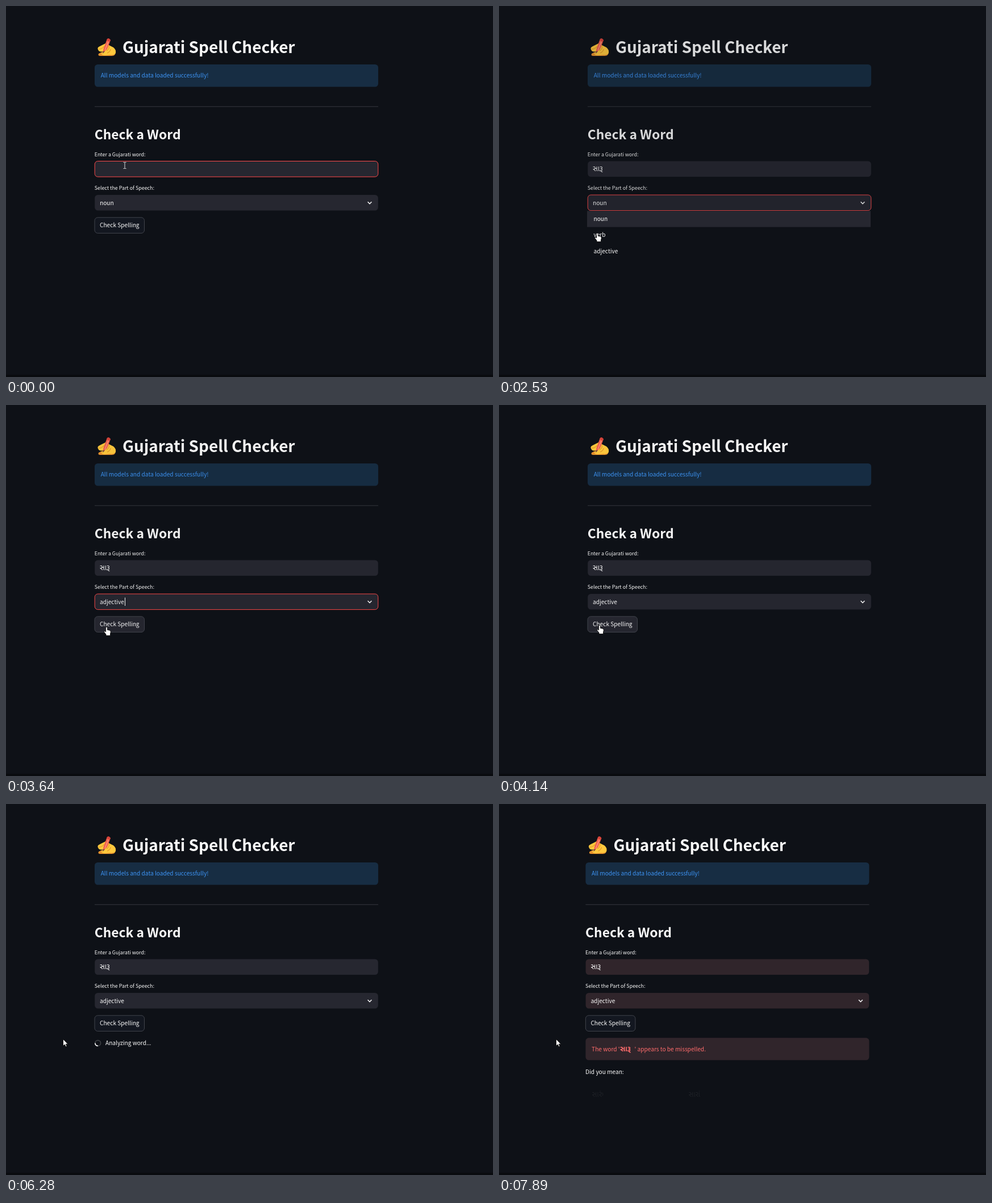
These frames come from a looping animation (857 by 654 pixels, 8 s). An HTML page:

```html
<!DOCTYPE html>
<html lang="en">
<head>
<meta charset="utf-8">
<title>Gujarati Spell Checker</title>
<style>
  html, body { margin: 0; width: 100%; height: 100%; overflow: hidden; background: #0e1117; }
  svg { display: block; width: 857px; height: 654px; }
  text { font: 10.15px "Noto Sans CJK SC", "Noto Sans CJK JP", "Noto Sans CJK", "Open Sans", sans-serif; fill: #fafafa; white-space: pre; }
  .title { font-size: 27.9px; font-weight: 700; }
  .heading { font-size: 22.8px; font-weight: 600; }
  .label { font-size: 8.88px; }
  .hint { font-size: 7.6px; fill: #a3a3a8; text-anchor: end; }
  .info { fill: #3d94f5; }
  .error text { fill: #ff6c6c; }
  .guj { font: 12.3px "Noto Sans Gujarati", "Noto Serif Gujarati", "Noto Sans", sans-serif; }
  .error .guj { font-weight: 700; }
  .field { fill: #262730; }
  .caret { fill: #fafafa; }
  .faint { opacity: .06; }
  .hidden { display: none; }
</style>
</head>
<body>
<svg viewBox="0 0 857 654">
  <rect width="857" height="654" fill="#0e1117"/>
  <rect y="650" width="857" height="4" fill="#090b0f"/>

  <g id="page">
    <g id="main">
      <g id="emoji">
        <path d="M163 84Q170 79 176 82L192 80Q194 88 186 88H166Q161 88 163 84Z" fill="#e8912d"/>
        <path d="M162 77Q160 73 165 71L175 66Q179 65 181 69L189 73Q194 77 193 83Q190 87 184 86L174 87Q168 87 168 83L171 80Q164 82 162 77Z" fill="#ffc83d"/>
        <path d="M178 58L184 60L178 76L170 83L172 74Z" fill="#f2604d"/>
        <path d="M178 58Q181 55 184 60L182.8 63L177 61Z" fill="#d8433a"/>
        <path d="M180 63L174 78" stroke="#ff9a80" stroke-width="1.3"/>
        <path d="M171 80L170 84L174 80Z" fill="#5a4038"/>
        <path d="M163 76Q169 76 173 71M181 70Q183 75 177 79M184 76Q184 80 178 83" fill="none" stroke="#e29a28" stroke-width="1.2"/>
      </g>
      <text class="title" x="205" y="83">Gujarati Spell Checker</text>
      <rect x="156" y="103" width="499" height="39.5" rx="5.5" fill="#172d43"/>
      <text class="info" x="166.7" y="126.3">All models and data loaded successfully!</text>
      <path d="M156 177.3H655" stroke="#35373e"/>
      <text class="heading" x="155.7" y="235">Check a Word</text>

      <text class="label" x="155.7" y="264.6">Enter a Gujarati word:</text>
      <rect id="input" class="field" x="156.2" y="273.5" width="498.6" height="27.6" rx="5.5"/>
      <text id="word" class="guj" x="165" y="290.6"></text>
      <rect id="wordCaret" class="caret" y="279.5" width="1" height="14.5"/>
      <text id="hint" class="hint" x="648.5" y="296">Press Enter to apply</text>

      <text class="label" x="155.7" y="324.4">Select the Part of Speech:</text>
      <rect id="select" class="field" x="156.2" y="333" width="498.6" height="27.6" rx="5.5"/>
      <text id="choice" x="165" y="350.5"></text>
      <rect id="choiceCaret" class="caret" x="209" y="339.5" width="1" height="14.5"/>
      <path d="M636.6 345.3L640 348.7L643.4 345.3" fill="none" stroke="#fafafa" stroke-width="1.6"/>

      <rect id="button" x="156" y="372.8" width="87.5" height="27.7" rx="5.5" stroke="#41444c"/>
      <text x="199.8" y="390.2" text-anchor="middle">Check Spelling</text>
    </g>

    <g id="loading">
      <circle cx="161.7" cy="421.5" r="4.9" fill="none" stroke="#3d4045" stroke-width="1.6"/>
      <path id="arc" d="M3.46-3.46A4.9 4.9 0 0 1 3.46 3.46" fill="none" stroke="#fafafa" stroke-width="1.7"/>
      <text x="175" y="425">Analyzing word...</text>
    </g>

    <g id="error" class="error">
      <rect x="156" y="412.3" width="499" height="39.3" rx="5.5" fill="#30252b"/>
      <text x="166.7" y="435.6">The word '</text>
      <text class="guj" x="216.6" y="436">સારૂ</text>
      <text x="242" y="435.6">' appears to be misspelled.</text>
    </g>

    <g id="suggestions">
      <text x="155.7" y="476">Did you mean:</text>
      <text class="guj faint" x="167" y="516">સારું</text>
      <text class="guj faint" x="337" y="516">સારાં</text>
    </g>
  </g>

  <g id="menu">
    <rect x="155" y="361.3" width="499" height="85" fill="#0e1117"/>
    <rect id="row" x="155" width="499" height="28.3" fill="#262730"/>
    <text x="166.5" y="379">noun</text>
    <text x="166.5" y="407.4">verb</text>
    <text x="166.5" y="435.8">adjective</text>
  </g>

  <g id="cursor" stroke="#000" stroke-width=".8" stroke-linejoin="round" fill="#fff">
    <path id="beam" d="M-2.5-5.5H-.7L0-5L.7-5.5H2.5M0-5V5M-2.5 5.5H-.7L0 5L.7 5.5H2.5" fill="none" stroke="#d8d8d8" stroke-width="1"/>
    <path id="arrow" d="M0 0V12L2.8 9.4L4.8 13.6L6.6 12.8L4.8 8.7H8.4Z"/>
    <path id="hand" d="M-1.4 1Q0-.8 1.4 1V5.4L5.4 6.2Q7.6 6.8 7.3 9.2L6.4 13V15.6H-1V13.4L-4.3 9.2Q-4.8 7.4-3 7.6L-1.4 9Z"/>
  </g>
</svg>

<script>
const LOOP = 8000;
const $ = id => document.getElementById(id);
const show = (id, on) => $(id).classList.toggle('hidden', !on);
const attr = (id, name, value) => $(id).setAttribute(name, value);
const within = (t, from, to) => t >= from && t < to;

// The screen refreshes at these moments: runs of about 120 ms with pauses between.
const runs = [[0, 0], [150, 1350], [1630, 1630], [1770, 2020], [2290, 3010], [3260, 3260],
  [3400, 4000], [4140, 4280], [4790, 4910], [5050, 5180], [5320, 7240], [7890, 7890]];
const ticks = runs.flatMap(([from, to]) => {
  const n = Math.round((to - from) / 125);
  const count = Math.max(n, Math.round((to - from) / 120));
  return Array.from({ length: count + 1 }, (_, i) => count ? from + (to - from) * i / count : from);
});
const snap = t => ticks.filter(tick => tick <= t + .01).pop();

// time, x, y, pointer shape
const path = [
  [0, 209, 281, 'beam'], [150, 209, 281, ''], [870, 520, 330, 'arrow'],
  [990, 600, 345, 'hand'], [1110, 642, 353, 'hand'], [1350, 640, 350, 'hand'],
  [1770, 640, 350, 'hand'], [2020, 560, 367, 'hand'], [2290, 300, 390, 'hand'],
  [2530, 173, 400, 'hand'], [2650, 172, 403, 'hand'], [2890, 175, 424, 'hand'],
  [3260, 175, 424, 'arrow'], [3400, 176, 418, 'arrow'], [3520, 176, 399, 'hand'],
  [3640, 177, 391, 'hand'], [4000, 177, 388, 'hand'], [4910, 177, 388, 'hand'],
  [5050, 177, 391.5, 'hand'], [5320, 177, 391.5, 'hand'], [5440, 150, 408, 'arrow'],
  [5680, 114, 414, 'arrow'], [5920, 100.5, 414.5, 'arrow'], [LOOP, 100.5, 414.5, 'arrow']
];
const fade = [[0, 1], [1630, 1], [2530, .86], [2650, .86], [3010, 1], [3400, 1],
  [3640, .97], [3880, .96], [4280, 1], [LOOP, 1]];

function at(keys, t) {
  const i = Math.max(1, keys.findIndex(k => k[0] > t));
  const a = keys[i - 1], b = keys[i];
  const p = (t - a[0]) / (b[0] - a[0]);
  return a.map((v, j) => typeof v === 'number' ? v + (b[j] - v) * p : v);
}

function typed(t) {
  const letters = [...'સારૂ'];
  return letters.slice(0, letters.filter((_, i) => t >= 150 + i * 120).length).join('');
}

function drawCursor(t) {
  const [, x, y, shape] = at(path, t);
  attr('cursor', 'transform', `translate(${x} ${y})`);
  for (const id of ['beam', 'arrow', 'hand']) show(id, id === shape);
}

function drawForm(t) {
  const text = typed(t);
  const editing = t < 1630;
  const done = t >= 7890;
  $('word').textContent = text;
  attr('input', 'stroke', editing ? '#ff4b4b' : 'none');
  show('hint', within(t, 150, 1630));
  show('wordCaret', within(t, 150, 870) || within(t, 1110, 1630));
  attr('wordCaret', 'x', [165, 173.5, 177, 183, 187][[...text].length]);

  $('choice').textContent = t < 3260 ? 'noun' : 'adjective';
  attr('select', 'stroke', within(t, 1770, 4140) ? '#ff4b4b' : 'none');
  show('choiceCaret', within(t, 3400, 3880));
  attr('button', 'fill', within(t, 3520, 5440) ? '#262730' : '#131720');
  for (const id of ['input', 'select']) $(id).style.fill = done ? '#30252b' : '';

  show('menu', within(t, 1770, 3260));
  attr('row', 'y', 361.3 + 28.35 * (t < 2650 ? 0 : t < 2890 ? 1 : 2));
}

function drawResult(t) {
  show('loading', within(t, 4790, 7000));
  attr('arc', 'transform', `translate(161.7 421.5) rotate(${62 + (t - 5180) * .72})`);
  show('error', t >= 7000);
  attr('error', 'opacity', Math.min(1, .4 + (t - 7000) / 300));
  show('suggestions', t >= 7890);
  attr('page', 'transform', `translate(${t >= 7890 ? -3.6 : 0} 0)`);
}

function render(time) {
  const t = snap(time % LOOP);
  attr('main', 'opacity', at(fade, t)[1]);
  drawForm(t);
  drawResult(t);
  drawCursor(t);
}

const start = performance.now();
function frame() {
  render(performance.now() - start);
  requestAnimationFrame(frame);
}
frame();
</script>
</body>
</html>
```
